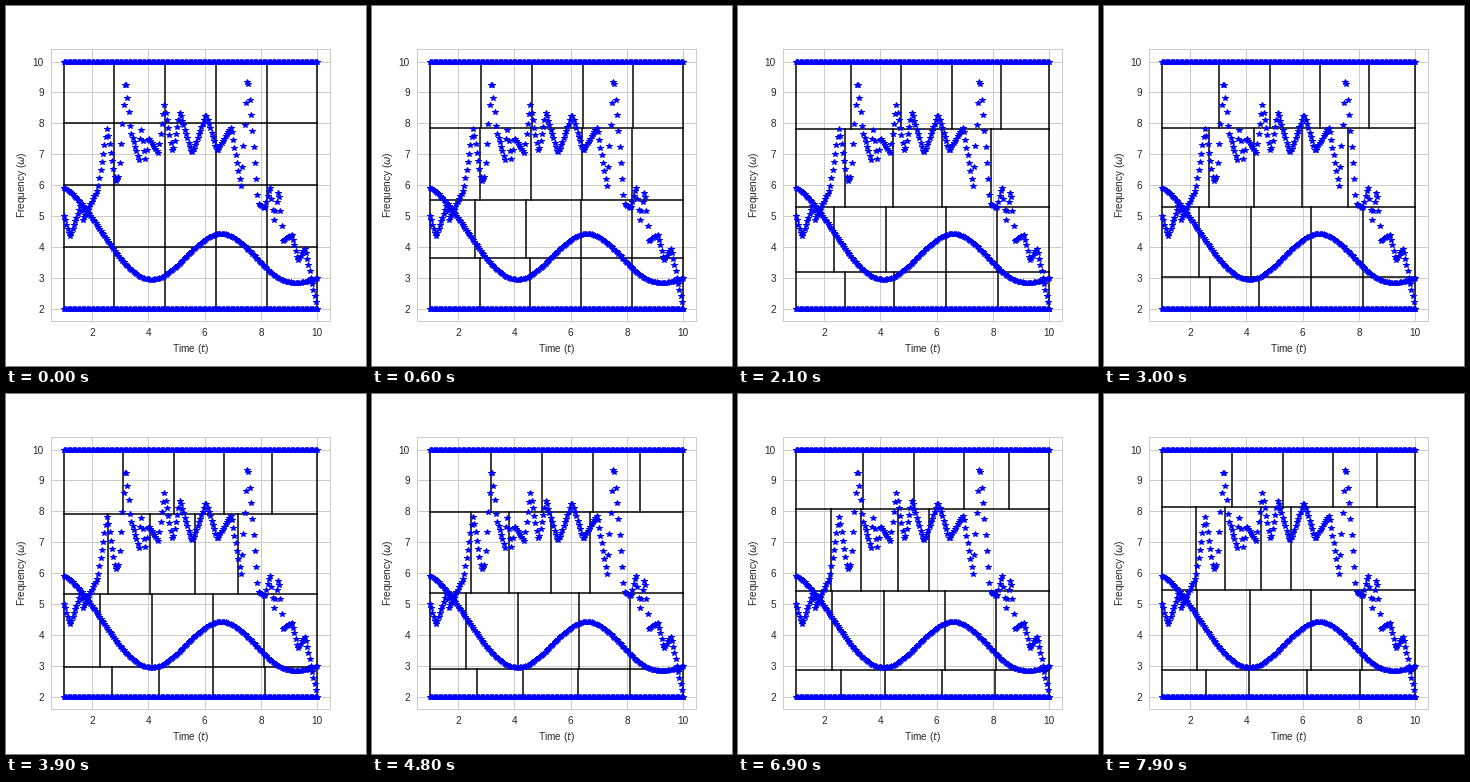
Write a matplotlib script that moves like this. It is 360x360 px and loops after 8000 ms.

```python
import numpy as np
import matplotlib.pyplot as plt
from matplotlib.animation import FuncAnimation

FRAMES, STEP_MS = 80, 100
T0, T1, W0, W1 = 1, 10, 2, 10
ROWS, COLS = 4, 5

# Peaks and dips (time, frequency) of the upper ridge
RIDGE = [
    (1.0, 5.0), (1.22, 4.32), (1.6, 5.35), (1.68, 4.87), (2.2, 5.85),
    (2.54, 7.82), (2.84, 6.1), (2.96, 6.3), (3.19, 9.5), (3.37, 7.75),
    (3.67, 6.81), (3.74, 7.91), (3.89, 6.81), (4.0, 7.55), (4.35, 7.04),
    (4.57, 8.6), (4.86, 7.04), (5.12, 8.35), (5.55, 7.01), (6.05, 8.3),
    (6.44, 7.1), (6.94, 7.88), (7.29, 5.94), (7.53, 9.6), (7.9, 5.4),
    (8.13, 5.22), (8.32, 5.97), (8.46, 4.84), (8.62, 5.87), (8.78, 4.19),
    (9.1, 4.4), (9.31, 3.54), (9.56, 3.96), (10.0, 2.0),
]

# Lower ridge: values at Chebyshev nodes
LOWER = [5.905, 5.776, 5.11, 3.816, 2.94, 3.816, 4.36, 3.346, 2.838, 2.918, 2.99]

plt.rcParams.update({
    "font.family": "Liberation Sans", "font.size": 10,
    "mathtext.fontset": "dejavusans",
    "text.color": ".15", "axes.labelcolor": ".15",
    "xtick.color": ".15", "ytick.color": ".15",
})


def settle(step, tau):
    return 1 - np.exp(-step / tau)


def drift(u):
    return u ** 1.15


def glide(u):
    return (u * u * (3 - 2 * u)) ** 1.3


def mesh_at(step):
    """Row levels and column cuts, moving off an even grid towards the ridges."""
    u = step / (FRAMES - 1)
    quick = settle(step, 6)
    levels = np.linspace(W1, W0, ROWS + 1)
    levels[1:-1] += [0.45 * u - 0.31 * quick,
                     0.24 * u - 0.79 * quick,
                     -1.16 * settle(step, 17)]
    cuts = np.tile(np.linspace(T0, T1, COLS + 1), (ROWS, 1))
    cuts[:, 1:-1] += [
        drift(u) * np.array([0.69, 0.70, 0.68, 0.44]),
        glide(u) * np.array([-0.58, -1.35, -1.86, -2.6]),
        settle(step, 12) * np.array([-0.53, -0.48, -0.10, -0.08]),
        drift(u) * np.array([-0.22, -0.50, -0.26, -0.15]),
    ]
    return levels, cuts


def lower_ridge(t):
    n = len(LOWER) - 1
    nodes = -np.cos(np.pi * np.arange(n + 1) / n)
    coef = np.polynomial.chebyshev.chebfit(nodes, LOWER, n)
    return np.polynomial.chebyshev.chebval((t - 5.5) / 4.5, coef)


fig = plt.figure(figsize=(5, 5), dpi=72, facecolor="white")
ax = fig.add_axes([0.125, 0.125, 0.775, 0.755])
ax.set(xlim=(0.55, 10.45), ylim=(1.6, 10.4),
       xticks=range(2, 11, 2), yticks=range(2, 11),
       xlabel="Time ($t$)", ylabel=r"Frequency ($\omega$)")
ax.tick_params(length=0, pad=7)
ax.set_axisbelow(True)
ax.grid(color=".8", lw=1)
for spine in ax.spines.values():
    spine.set(color=".8", linewidth=1)

time = np.linspace(T0, T1, 200)
for ridge in (np.full_like(time, W0), np.full_like(time, W1),
              lower_ridge(time), np.interp(time, *np.transpose(RIDGE))):
    ax.plot(time, ridge, "*", color="blue", ms=6, zorder=3)


def edges(count):
    return [ax.plot([], [], color="black", lw=1.5, zorder=2)[0]
            for _ in range(count)]


level_lines = edges(ROWS + 1)
cut_lines = [edges(COLS + 1) for _ in range(ROWS)]


def update(step):
    levels, cuts = mesh_at(step)
    for line, w in zip(level_lines, levels):
        line.set_data([T0, T1], [w, w])
    for r in range(ROWS):
        for line, t in zip(cut_lines[r], cuts[r]):
            line.set_data([t, t], levels[r:r + 2])
    return level_lines + sum(cut_lines, [])


anim = FuncAnimation(fig, update, frames=FRAMES, interval=STEP_MS,
                     repeat=True, repeat_delay=0, blit=False)
plt.show()
```
